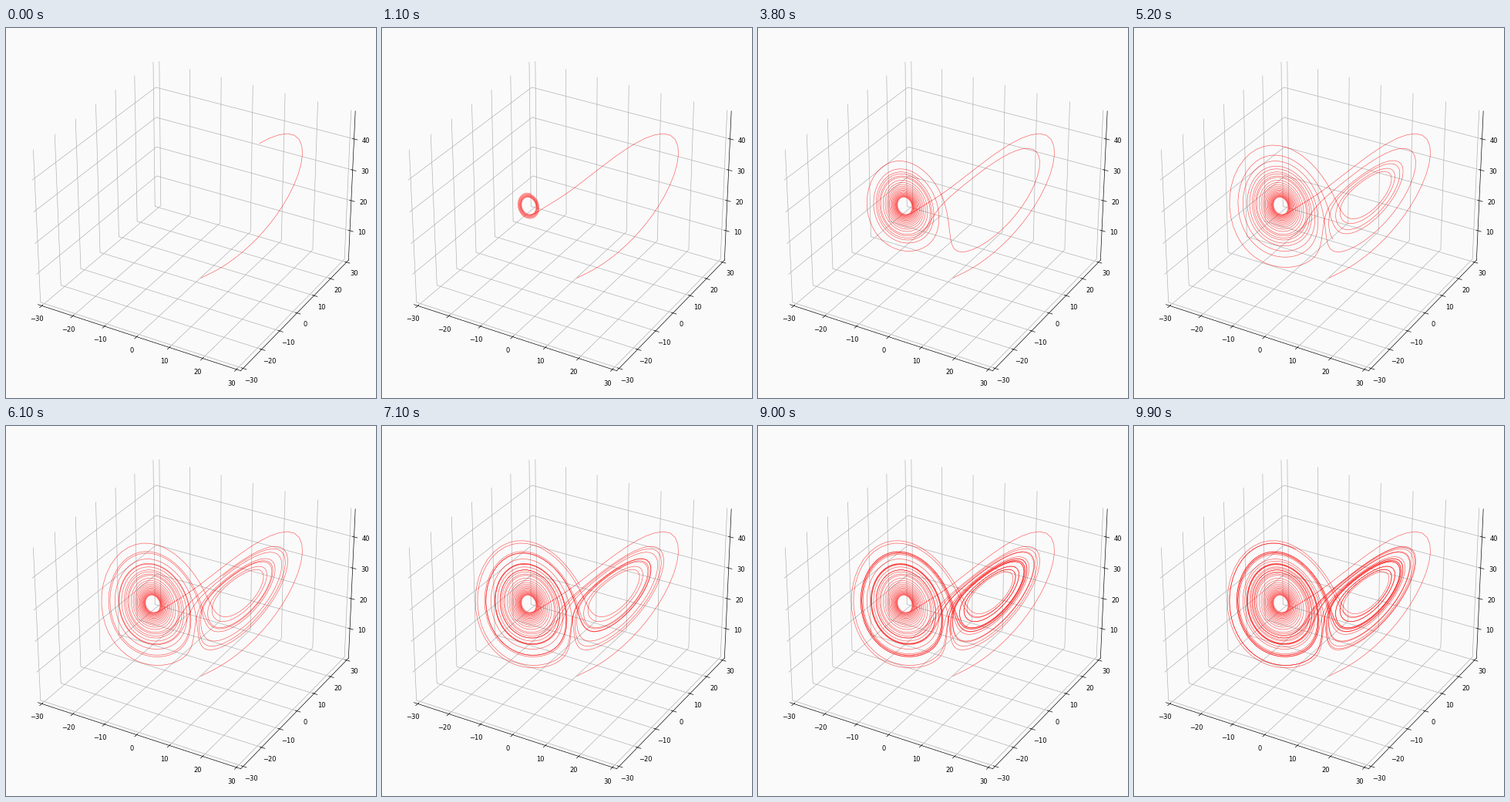
These frames come from a looping animation (480x480 px, 10000 ms). A matplotlib script:

```python
import numpy as np
import matplotlib.pyplot as plt
from matplotlib.animation import FuncAnimation

SIGMA, RHO, BETA = 10.0, 28.0, 8.0 / 3.0
DT = 0.01
FRAMES, PER_FRAME = 100, 40
BG = "#fafafa"


def lorenz(p):
    x, y, z = p
    return np.array([SIGMA * (y - x), x * (RHO - z) - y, x * y - BETA * z])


def rk4(p, h):
    k1 = lorenz(p)
    k2 = lorenz(p + h / 2 * k1)
    k3 = lorenz(p + h / 2 * k2)
    k4 = lorenz(p + h * k3)
    return p + h / 6 * (k1 + 2 * k2 + 2 * k3 + k4)


def trajectory(n, start=(1.0, 1.0, 1.0)):
    points = [np.array(start)]
    for _ in range(n - 1):
        points.append(rk4(points[-1], DT))
    return np.array(points).T


def padded(lo, hi):
    """Limits with a small gap between the end values and the box edge."""
    gap = (hi - lo) / 48
    return lo - gap, hi + gap


path = trajectory(FRAMES * PER_FRAME)

fig = plt.figure(figsize=(8, 8), dpi=60, facecolor=BG)
ax = fig.add_axes([0.0125, 0.012, 0.976, 0.976], projection="3d", facecolor=BG)
ax.view_init(elev=30, azim=-60)

line, = ax.plot(*path, color="red", lw=0.7, alpha=0.7)

ax.set_xlim(*padded(-30, 30))
ax.set_ylim(*padded(-30, 30))
ax.set_zlim(*padded(path[2].min(), path[2].max()))
ax.set_xticks(range(-30, 31, 10))
ax.set_yticks(range(-30, 31, 10))
ax.set_zticks(range(10, 41, 10))

for axis in (ax.xaxis, ax.yaxis, ax.zaxis):
    axis.set_pane_color((1, 1, 1, 0))
ax.yaxis.pane.set_edgecolor("#f1f1f1")


def update(i):
    line.set_data_3d(*path[:, :(i + 1) * PER_FRAME])
    return line,


anim = FuncAnimation(fig, update, frames=FRAMES, interval=100,
                     repeat=True, repeat_delay=0, blit=False)
plt.show()
```
